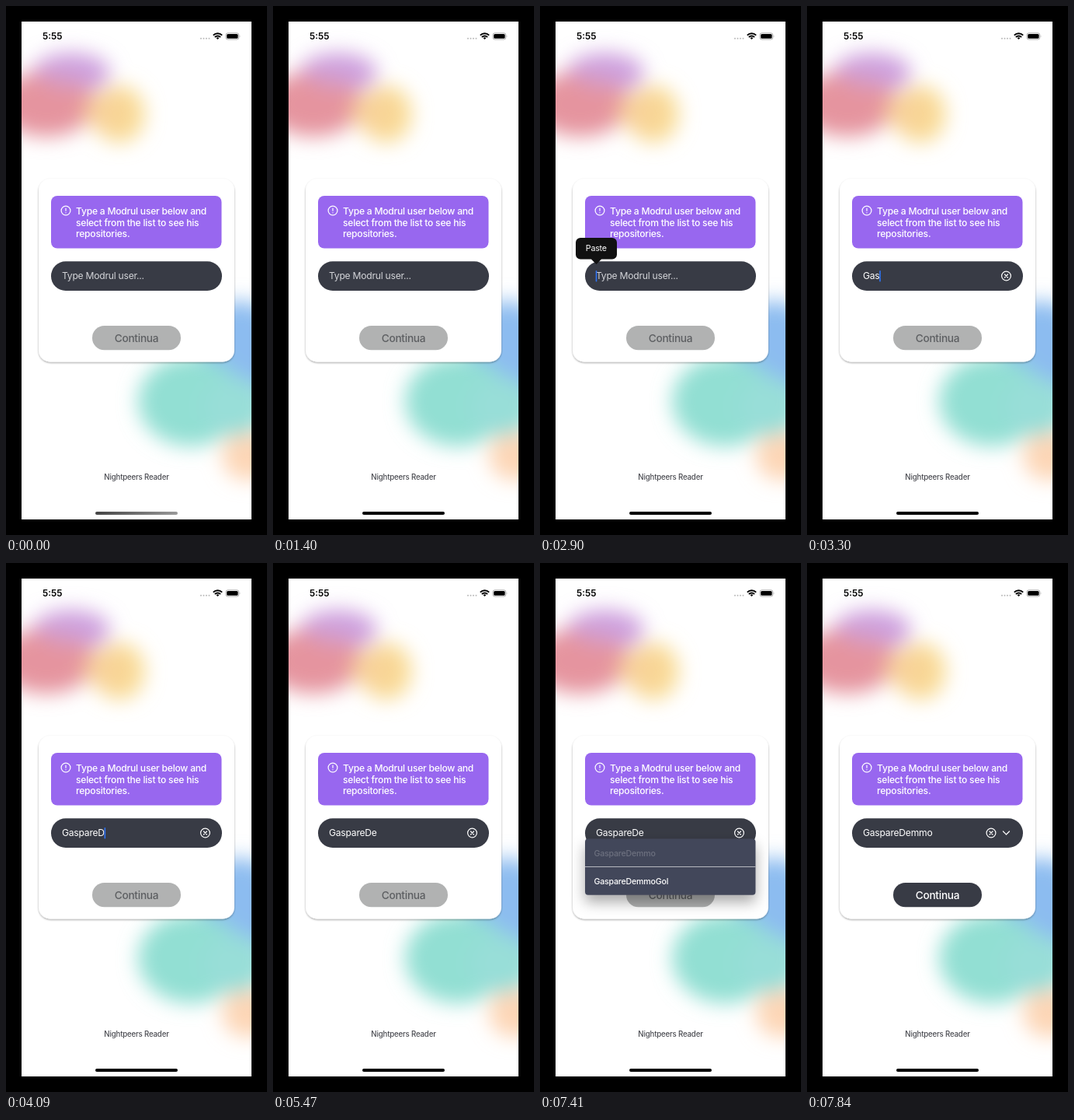
Animation of 336x680 px, one loop 8000 ms. Source, as an HTML page:

```html
<!DOCTYPE html>
<html lang="en">
<head>
<meta charset="utf-8">
<title>User picker</title>
<style>
  html, body { margin: 0; width: 100%; height: 100%; overflow: hidden; background: #000; }
  svg { display: block; }
  text { font: 500 12.14px Inter, "Liberation Sans", sans-serif; letter-spacing: -.02em; fill: #fff; }
  .light { font-weight: 400; }
  .row { font-size: 10.63px; }
  .line { fill: none; stroke: #fff; stroke-width: 1.2; stroke-linecap: round; stroke-linejoin: round; }
</style>
</head>
<body>
<svg width="336" height="680" viewBox="0 0 336 680">
  <defs>
    <clipPath id="screen"><rect x="20" y="20" width="296" height="640"/></clipPath>
    <filter id="blur" x="-60%" y="-60%" width="220%" height="220%"><feGaussianBlur stdDeviation="13"/></filter>
    <filter id="cardShadow"><feDropShadow dx="0" dy="1.2" stdDeviation="1.1" flood-opacity=".36"/></filter>
    <filter id="listShadow" x="-20%" y="-50%" width="140%" height="220%">
      <feDropShadow dx="0" dy="9" stdDeviation="9" flood-opacity=".34"/>
    </filter>
    <linearGradient id="barFade"><stop stop-color="#444"/><stop offset=".6" stop-color="#777"/><stop offset="1" stop-color="#999"/></linearGradient>
  </defs>

  <g clip-path="url(#screen)">
    <rect x="20" y="20" width="296" height="640" fill="#fff"/>
    <g filter="url(#blur)">
      <ellipse cx="84" cy="86" rx="50" ry="26" fill="#cfa0df"/>
      <ellipse cx="146" cy="139" rx="33" ry="37" fill="#f9dc95"/>
      <ellipse cx="52" cy="126" rx="62" ry="42" fill="#e5949f"/>
      <ellipse cx="84" cy="88" rx="40" ry="18" fill="#cda0dc" opacity=".6"/>
      <ellipse cx="128" cy="136" rx="30" ry="28" fill="#f7cf98" opacity=".65"/>
    </g>
    <g filter="url(#blur)">
      <ellipse cx="312" cy="578" rx="34" ry="32" fill="#fdd6b6"/>
      <ellipse cx="302" cy="445" rx="52" ry="66" fill="#8cbcf0"/>
      <ellipse cx="238" cy="508" rx="68" ry="58" fill="#92dfd3"/>
      <ellipse cx="295" cy="515" rx="42" ry="38" fill="#98ded8"/>
    </g>
  </g>

  <!-- status bar -->
  <text x="47" y="43" style="font-size:11.8px;font-weight:600;fill:#000;letter-spacing:0">5:55</text>
  <path d="M251 41.7h12" stroke="#b9b9b9" stroke-width="2" stroke-dasharray="0 3.5" stroke-linecap="round"/>
  <g fill="none" stroke="#000" stroke-width="1.9">
    <path d="M266.8 37.7a8 8 0 0 1 11.4 0M268.9 40a5 5 0 0 1 7.2 0"/>
    <path d="M270.6 41.2a2.6 2.6 0 0 1 3.8 0L272.5 43z" fill="#000" stroke="none"/>
  </g>
  <rect x="283" y="34.8" width="16.8" height="8.2" rx="2.5" fill="none" stroke="#999" stroke-width=".8"/>
  <rect x="284.2" y="36" width="14.4" height="5.8" rx="1.5"/>
  <path d="M300.8 37.5q1.3 1.4 0 2.8z" fill="#999"/>

  <!-- card -->
  <rect x="42" y="222" width="252" height="235.5" rx="15" fill="#fff" filter="url(#cardShadow)"/>
  <rect x="58" y="244" width="219.5" height="67.5" rx="8" fill="#9867ef"/>
  <g class="line"><circle cx="77" cy="263" r="5.9"/><path d="M77 260v3.2M77 265.7v.1"/></g>
  <text x="90" y="268">Type a Modrul user below and</text>
  <text x="90" y="282.7">select from the list to see his</text>
  <text x="90" y="297.3">repositories.</text>

  <rect id="button" x="111" y="411" width="114" height="31.3" rx="15.6"/>
  <text id="label" x="168" y="431.6" text-anchor="middle" style="font-size:13.66px">Continua</text>

  <!-- search field -->
  <rect x="58" y="328.3" width="220" height="37.7" rx="18.8" fill="#383b45"/>
  <text id="hint" class="light" x="72" y="351.4" style="fill:#d3d4d8">Type Modrul user...</text>
  <text id="typed" class="light" x="72" y="351.4"></text>
  <rect id="caret" y="340" width="1.6" height="14.5" rx=".8" fill="#2f74f5"/>
  <g id="clear" class="line"><circle r="5.9"/><path d="M-2 -2l4 4M2 -2l-4 4"/></g>
  <path id="chevron" class="line" d="M252.5 345l4 4 4-4" stroke-width="1.4"/>
  <g id="spinner" stroke="#bbb" stroke-width="1.7" stroke-linecap="round"></g>

  <!-- suggestions -->
  <g id="list">
    <rect x="58" y="354.5" width="219.5" height="72.3" rx="4" fill="#43475a" filter="url(#listShadow)"/>
    <path d="M58 390.5h219.5" stroke="#c4c6cc" stroke-width=".9"/>
    <text id="first" class="row" x="69.5" y="376.7">GaspareDemmo</text>
    <text class="row" x="69.5" y="412.7">GaspareDemmoGol</text>
  </g>

  <g id="paste">
    <path d="M52 298h41a6 6 0 0 1 6 6v15.5a6 6 0 0 1-6 6H79l-6.5 6.5-6.5-6.5H52a6 6 0 0 1-6-6V304a6 6 0 0 1 6-6z" fill="#111"/>
    <text class="light" x="72.3" y="315.4" text-anchor="middle" style="font-size:10.7px">Paste</text>
  </g>

  <text x="168" y="609" text-anchor="middle" style="font-size:9.7px;fill:#4b4c52">Nightpeers Reader</text>
  <rect id="home" x="115" y="650" width="106" height="4" rx="2"/>
</svg>
<script>
const LOOP = 8000, USER = 'GaspareDemmo', CHOSEN = 7630;
const $ = id => document.getElementById(id);

// Each track is a list of [start time, value] pairs held until the next one.
const TYPED = [[0, 0], [3010, 1], [3110, 2], [3300, 3], [3410, 4], [3560, 5], [3730, 7], [4090, 8], [4370, 9], [CHOSEN, 12]];
const CARET = [[0, 0], [1960, 1], [2310, .5], [2430, 0], [2670, 1], [4880, .5], [5010, 0], [5150, .5], [5260, 1],
  [5360, .5], [5470, 0], [6060, .85], [6180, 1], [6420, .5], [6540, 0], [7080, .5], [7200, 1], [7410, 0]];
const PASTE = [[0, 0], [2780, .6], [2900, 1], [3010, .5], [3110, 0]];
const held = (track, t) => track.findLast(([start]) => start <= t)[1];
const between = (t, from, to) => t >= from && t < to;
const fade = (id, opacity) => $(id).setAttribute('opacity', +opacity);

$('spinner').innerHTML = Array.from({ length: 8 }, (_, i) =>
  `<path d="M0 -3.4V-6.4" transform="rotate(${i * 45})" opacity="${.25 + i * .1}"/>`).join('');

function draw(t) {
  const count = held(TYPED, t), chosen = t >= CHOSEN, loading = between(t, 5150, 5470);

  $('typed').textContent = USER.slice(0, count);
  const end = count ? $('typed').getComputedTextLength() : 0;
  $('caret').setAttribute('x', 71.7 + end);
  fade('caret', held(CARET, t));
  fade('hint', count === 0);

  $('clear').setAttribute('transform', `translate(${chosen ? 237 : 256.5} 347)`);
  fade('clear', count > 0 && !loading);
  fade('chevron', chosen);
  $('spinner').setAttribute('transform', `translate(258 347) rotate(${Math.floor(t / 100) * 45})`);
  fade('spinner', loading);

  fade('paste', held(PASTE, t));
  fade('list', between(t, 6060, CHOSEN));
  fade('first', t < 7410 ? 1 : .22);

  $('button').setAttribute('fill', chosen ? '#383b45' : '#b1b2b2');
  $('label').style.fill = chosen ? '#fff' : '#5d5f62';
  $('home').setAttribute('fill', t < 500 ? 'url(#barFade)' : '#000');
}

function tick() {
  draw(performance.now() % LOOP);
  requestAnimationFrame(tick);
}
tick();
</script>
</body>
</html>
```
